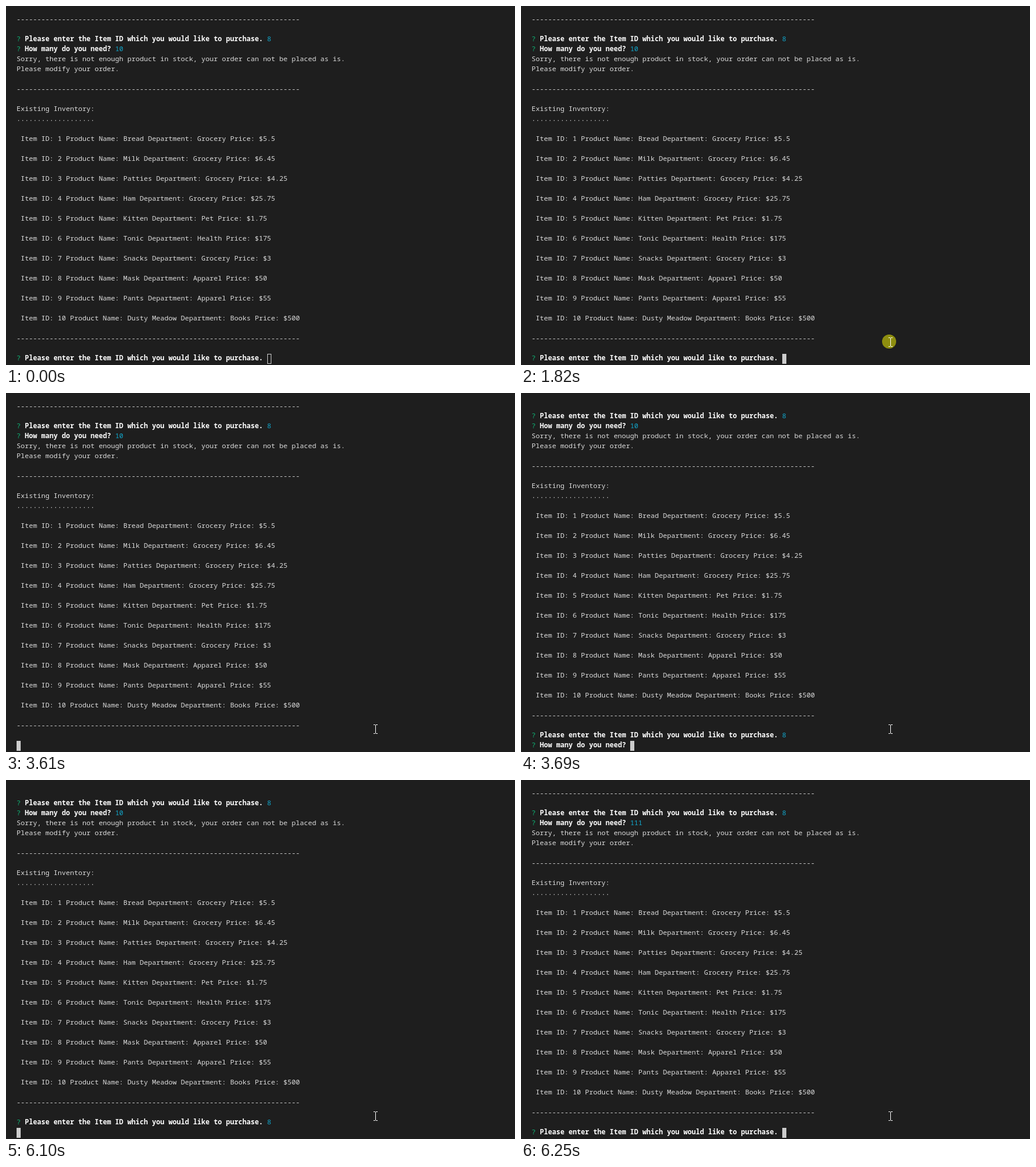
An HTML page that plays this animation: 867 px wide and 612 px high, repeating every 8000 ms.

```html
<!DOCTYPE html>
<html lang="en">
<head>
<meta charset="utf-8">
<title>Storefront terminal</title>
<style>
  html, body { margin: 0; width: 100%; height: 100%; overflow: hidden; background: #1e1e1e; }
  #stage { position: relative; width: 867px; height: 612px; overflow: hidden; }
  #screen {
    position: absolute; left: 18px; top: 13px; margin: 0;
    font: 500 11.667px/17px "Noto Sans Mono", "DejaVu Sans Mono", monospace;
    font-variant-ligatures: none; white-space: pre; color: #dcdcdc;
  }
  #screen b { font-weight: 700; color: #fff; }
  #screen i { font-style: normal; color: #0dbc79; }
  #screen em { font-style: normal; color: #11a8cd; }
  #caret {
    position: absolute; top: 593px; width: 7px; height: 17px;
    box-sizing: border-box; border: 1px solid #ccc;
  }
  #caret.focus { background: #ccc; }
  #mouse { position: absolute; left: 0; top: 0; overflow: visible; }
</style>
</head>
<body>
<div id="stage">
  <pre id="screen"></pre>
  <div id="caret"></div>
  <svg id="mouse" width="1" height="1">
    <circle id="click" cx="-2" cy="-1" r="12" fill="#8e8e0f"/>
    <path d="M-3 -7.5H0M1 -7.5H4M.5 -7V7M-3 7.5H0M1 7.5H4" fill="none" stroke="#fff"/>
  </svg>
</div>
<script>
const LOOP = 8000, ROWS = 35, LEFT = 18, CELL = 7;
const $ = id => document.getElementById(id);

const stock = [
  ["Bread", "Grocery", "5.5"], ["Milk", "Grocery", "6.45"],
  ["Patties", "Grocery", "4.25"], ["Ham", "Grocery", "25.75"],
  ["Kitten", "Pet", "1.75"], ["Tonic", "Health", "175"],
  ["Snacks", "Grocery", "3"], ["Mask", "Apparel", "50"],
  ["Pants", "Apparel", "55"], ["Dusty Meadow", "Books", "500"]
];
const rule = "-".repeat(69);
const ask = (text, answer = "") => `<i>?</i> <b>${text}</b> ${answer}`;
const askItem = answer => ask("Please enter the Item ID which you would like to purchase.", answer);
const askCount = answer => ask("How many do you need?", answer);
const done = value => `<em>${value}</em>`;

const order = count => [
  askItem(done(8)),
  askCount(done(count)),
  "Sorry, there is not enough product in stock, your order can not be placed as is.",
  "Please modify your order.",
  "", rule, "",
  "Existing Inventory:", ".".repeat(19), "",
  ...stock.flatMap(([name, dept, price], i) =>
    [` Item ID: ${i + 1} Product Name: ${name} Department: ${dept} Price: $${price}`, ""]),
  rule, ""
];

const past = [rule, "", ...order(10)];
const picked = [...past, askItem(done(8))];
const failed = [...past, ...order(111)];
const partial = [...past, ...order(111).slice(0, 25)];

// start time, lines above, current line, caret column
const screens = [
  [0, past, askItem(), 61],
  [2750, past, askItem("8"), 62],
  [3610, past, "", 0],
  [3690, picked, askCount(), 24],
  [5000, picked, askCount("1"), 25],
  [5170, picked, askCount("11"), 26],
  [5320, picked, askCount("111"), 27],
  [6100, picked, "", 0],
  [6180, partial, " ", 1],
  [6250, failed, askItem(), 61]
];

// start time, pointer x, y
const moves = [
  [0, -50, -50],
  [120, 713, 597], [200, 690, 590], [270, 663, 582], [350, 640, 576],
  [430, 629, 573]
];

const at = (steps, t) => steps.findLast(step => step[0] <= t);
let shown;

function draw(now) {
  const t = now % LOOP;
  const screen = at(screens, t);
  if (screen !== shown) {
    const [, above, line, col] = shown = screen;
    $("screen").innerHTML = [...above, line].slice(-ROWS).join("\n");
    $("caret").style.left = LEFT + col * CELL + "px";
  }
  $("caret").classList.toggle("focus", t >= 1820);
  const [, x, y] = at(moves, t);
  $("mouse").style.transform = `translate(${x}px, ${y}px)`;
  $("click").style.visibility = t >= 1820 && t < 1910 ? "visible" : "hidden";
}

const start = performance.now();
function tick() {
  draw(performance.now() - start);
  requestAnimationFrame(tick);
}
tick();
</script>
</body>
</html>
```
